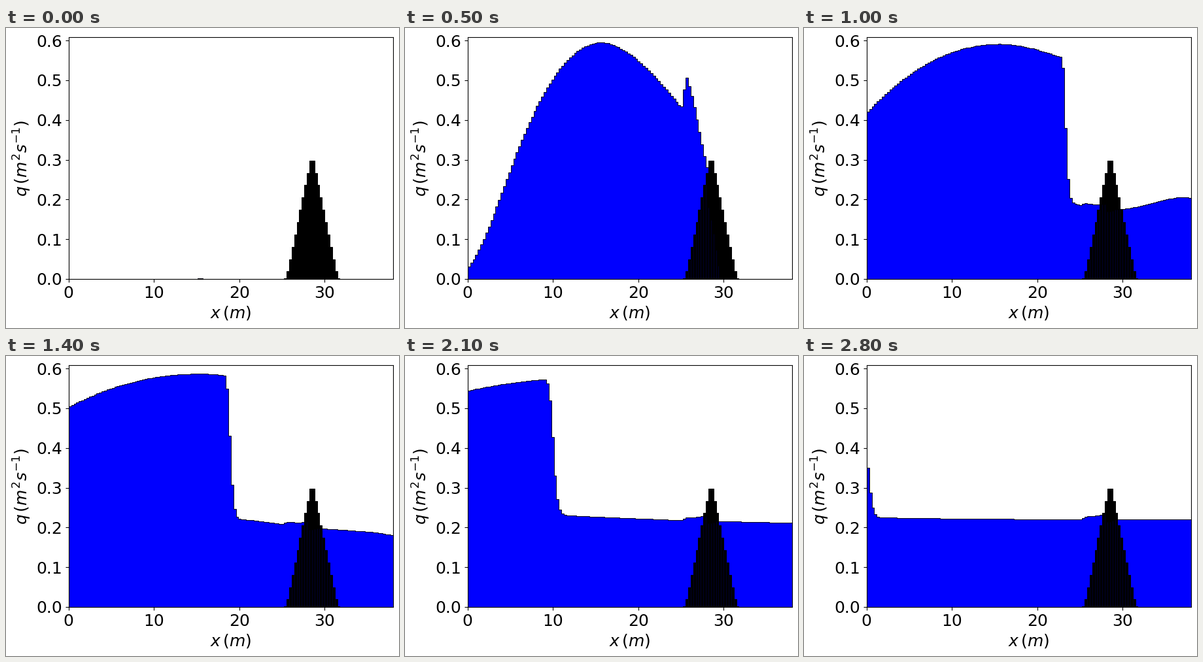
Recreate the animation shown at these times as a matplotlib script. Size 601 by 459 pixels, loop 2.9 s.

```python
import numpy as np
import matplotlib.pyplot as plt
from matplotlib.animation import FuncAnimation

W, H, DPI = 601, 459, 100
FRAMES, INTERVAL = 29, 100      # one simulated second per frame
N, LENGTH = 128, 38.0
DX = LENGTH / N
G, MANNING, TOL, CFL = 9.81, 0.0125, 1e-3, 0.5
DT_START = 3e-4
Q_TOP = 0.608

edges = np.linspace(0, LENGTH, N + 1)
centres = (edges[:-1] + edges[1:]) / 2
z_edges = np.maximum(0, 0.4 * (1 - np.abs(edges - 28.5) / 3))
bed = (z_edges[:-1] + z_edges[1:]) / 2


def velocity(h, q):
    return np.where(h > TOL, q / np.maximum(h, TOL), 0)


def hll(hl, ul, hr, ur):
    """Mass and momentum flux between two shallow-water states."""
    al, ar = np.sqrt(G * hl), np.sqrt(G * hr)
    u_mid = (ul + ur) / 2 + al - ar
    a_mid = np.abs((al + ar) / 2 + (ul - ur) / 4)
    sl = np.where(hl > TOL, np.minimum(ul - al, u_mid - a_mid), ur - 2 * ar)
    sr = np.where(hr > TOL, np.maximum(ur + ar, u_mid + a_mid), ul + 2 * al)
    sl, sr = np.minimum(sl, 0), np.maximum(sr, 0)
    span = np.maximum(sr - sl, 1e-9)
    wet = np.maximum(hl, hr) > TOL

    def blend(fl, fr, jump):
        return np.where(wet, (sr * fl - sl * fr + sl * sr * jump) / span, 0)

    ql, qr = hl * ul, hr * ur
    mass = blend(ql, qr, hr - hl)
    momentum = blend(ql * ul + G * hl**2 / 2, qr * ur + G * hr**2 / 2, qr - ql)
    return mass, momentum


def friction(h, q, dt):
    u = velocity(h, q)
    drag = G * MANNING**2 / np.cbrt(np.maximum(h, TOL))
    damp = 1 + 2 * dt * drag * np.abs(u) / np.maximum(h, TOL)
    return q - dt * drag * np.abs(u) * u / damp


def advance(h, q, dt):
    # Ghost cells copy the open ends; friction acts on the inner cells only.
    hp, qp, zp = (np.pad(a, 1, mode="edge") for a in (h, q, bed))
    q = qp[1:-1] = friction(h, q, dt)
    u, eta = velocity(hp, qp), hp + zp
    sill = np.maximum(zp[:-1], zp[1:])
    hl = np.maximum(0, eta[:-1] - sill)
    hr = np.maximum(0, eta[1:] - sill)
    zl = np.minimum(sill, eta[:-1])
    zr = np.minimum(sill, eta[1:])
    mass, momentum = hll(hl, u[:-1], hr, u[1:])
    slope = G * (hl[1:] + hr[:-1]) / 2 * (zl[1:] - zr[:-1])
    h = np.maximum(0, h - dt / DX * np.diff(mass))
    q = q - dt / DX * (np.diff(momentum) + slope)
    return h, np.where(h > TOL, q, 0)


def simulate():
    """Discharge profile at every whole second after the dam breaks."""
    h = np.where(centres <= 15.5, 0.75, 0.0)
    h, q = advance(h, np.zeros(N), DT_START)
    t, profiles = DT_START, [q]
    for second in range(1, FRAMES):
        while t < second - 1e-9:
            speed = np.max(np.abs(velocity(h, q)) + np.sqrt(G * h))
            dt = min(max(CFL * DX / speed, 5e-4), second - t)
            h, q = advance(h, q, dt)
            t += dt
        profiles.append(q)
    return profiles


profiles = simulate()
hump = bed / bed.max() * 0.298

plt.rcParams.update({"font.family": "DejaVu Sans", "font.size": 18})
fig = plt.figure(figsize=((W + 0.001) / DPI, (H + 0.001) / DPI), dpi=DPI)
ax = fig.add_axes([95.75 / W, 75.1 / H, 496 / W, 369.6 / H])

water = ax.stairs(profiles[0], edges, fill=True, facecolor="blue",
                  edgecolor="black", linewidth=0.65)
ax.stairs(hump, edges, fill=True, facecolor="black", edgecolor="black",
          linewidth=0.75, zorder=1.5)
seams = ax.vlines([], [], [], colors=[(0, 0, 0.2)], linewidth=0.6, zorder=1.6)

ax.set_xlim(0, LENGTH)
ax.set_ylim(0, Q_TOP)
ax.set_xticks(range(0, 40, 10))
ax.set_yticks(np.arange(7) / 10)
ax.set_xlabel(r"$x \, (m)$")
ax.set_ylabel(r"$q \, (m^2s^{-1})$")


def draw(frame):
    q = profiles[frame]
    water.set_data(values=q)
    low = np.minimum(hump, q)
    tops = np.minimum(low[:-1], low[1:])
    seams.set_segments([[(x, 0), (x, y)]
                        for x, y in zip(edges[1:-1], tops) if y > 0.01])
    return water, seams


anim = FuncAnimation(fig, draw, frames=FRAMES, interval=INTERVAL,
                     repeat=True, repeat_delay=0)
plt.show()
```
